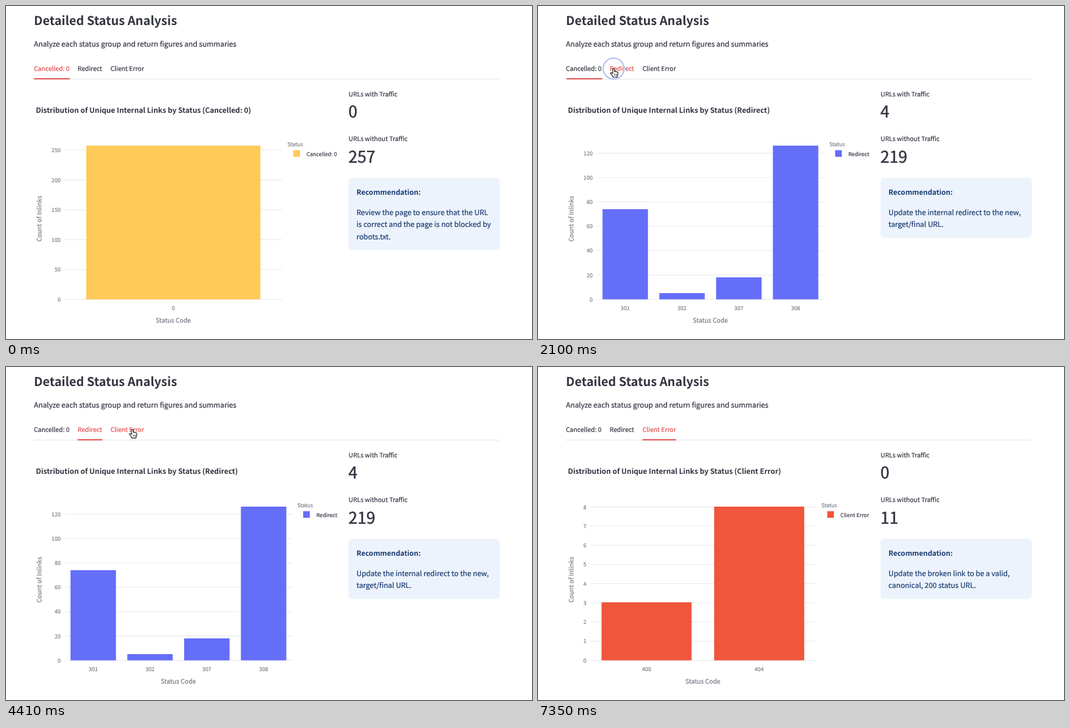
Write an HTML page with a canvas that moves like this. It is 800 px wide and 508 px high and loops after 7630 ms.

```html
<!DOCTYPE html>
<html lang="en">
<head>
<meta charset="utf-8">
<title>Detailed Status Analysis</title>
<style>
  html, body { margin: 0; width: 100%; height: 100%; overflow: hidden; background: #fff; }
  canvas { display: block; width: 100vw; height: 100vh; }
</style>
</head>
<body>
<canvas id="stage" width="800" height="508"></canvas>
<script>
const ctx = document.getElementById('stage').getContext('2d');
const LOOP = 7630, STEP = 70;
const FAMILY = '"Noto Sans CJK JP", "Noto Sans CJK SC", "Noto Sans CJK", "Open Sans", sans-serif';
const INK = '#31333f', MUTED = '#757783', RED = '#e04c4b', NAVY = '#1b3b70';
const BASE = 447.5, FULL = 234;
const BODY = 11, SMALL = 9.58, TINY = 8.2;

const tabs = [
  { label: 'Cancelled: 0', x: 42.5, w: 54.5 },
  { label: 'Redirect', x: 109, w: 37.5 },
  { label: 'Client Error', x: 159, w: 51 }
];

const views = [
  { color: '#ffca57', x0: 89, x1: 420, tick: 50, tickX: 83, legendX: 428,
    bars: [['0', 257]], traffic: ['0', '257'],
    advice: ['Review the page to ensure that the URL', 'is correct and the page is not blocked by', 'robots.txt.'] },
  { color: '#656ef9', x0: 89.5, x1: 435, tick: 20, tickX: 83, legendX: 443,
    bars: [['301', 74], ['302', 5], ['307', 18], ['308', 126]], traffic: ['4', '219'],
    advice: ['Update the internal redirect to the new,', 'target/final URL.'] },
  { color: '#f0563c', x0: 79.5, x1: 422, tick: 1, tickX: 73.5, legendX: 431,
    bars: [['400', 3], ['404', 8]], traffic: ['0', '11'],
    advice: ['Update the broken link to be a valid,', 'canonical, 200 status URL.'] }
];

// Pointer hot spot over time: [ms, x, y]
const route = [
  [0, -14, 330], [490, 34, 285], [1050, 34, 285], [1330, 110, 96], [1680, 115, 95.5],
  [4130, 115, 95.5], [4270, 191, 95], [4480, 193, 95.5],
  [5880, 193, 95.5], [6160, 313, 340], [6440, 375, 525], [LOOP, 375, 525]
];
const clicks = [2030, 4480];

const clamp = v => Math.max(0, Math.min(1, v));
const smooth = v => { v = clamp(v); return v * v * (3 - 2 * v); };
const mix = (a, b, k) => a + (b - a) * k;

function text(str, x, y, size, color = INK, align = 'left', weight = 400) {
  ctx.font = `${weight} ${size}px ${FAMILY}`;
  ctx.textRendering = 'geometricPrecision';
  ctx.fillStyle = ctx.strokeStyle = color;
  ctx.textAlign = align;
  ctx.fillText(str, x, y);
  if (weight > 400) return;
  // A hairline outline gives regular text a slightly firmer stem.
  ctx.lineWidth = size * .018;
  ctx.strokeText(str, x, y);
}

function box(x, y, w, h, color) {
  ctx.fillStyle = color;
  ctx.fillRect(x, y, w, h);
}

function pointerAt(t) {
  const i = route.findIndex(p => p[0] > t);
  const [t0, x0, y0] = route[i - 1], [t1, x1, y1] = route[i];
  const k = (t - t0) / (t1 - t0);
  return { x: mix(x0, x1, k), y: mix(y0, y1, k) };
}

function drawTabs(t, active, hovered) {
  box(42, 111, 709, 1, '#e6e7eb');
  tabs.forEach((tab, i) =>
    text(tab.label, tab.x, 98.6, SMALL, i === active || i === hovered ? RED : INK));
  let { x, w } = tabs[0];
  clicks.forEach((click, i) => {
    const k = smooth((t - click - 50) / 300);
    x = mix(x, tabs[i + 1].x, k);
    w = mix(w, tabs[i + 1].w, k);
  });
  box(x, 110.2, w, 1.8, RED);
}

function drawChart(view, name) {
  const { x0, x1, bars, color, legendX } = view;
  const max = Math.max(...bars.map(b => b[1]));
  const slot = (x1 - x0) / bars.length;
  text(`Distribution of Unique Internal Links by Status (${name})`, 45.5, 163.3, 11.04, INK, 'left', 700);

  for (let v = 0; v <= max; v += view.tick) {
    const y = BASE - v / max * FULL;
    box(x0, y - .5, x1 - x0, 1, '#e8e9ed');
    text(v, view.tickX, y + 3.2, TINY, MUTED, 'right');
  }
  bars.forEach(([label, value], i) => {
    const top = Math.floor(BASE - value / max * FULL);
    box(x0 + slot * (i + .1), top, slot * .8, BASE - top, color);
    text(label, x0 + slot * (i + .5), 464, TINY, MUTED, 'center');
  });
  text('Status Code', (x0 + x1) / 2, 482.5, SMALL, MUTED, 'center');

  ctx.save();
  ctx.translate(53.5, 324.5);
  ctx.rotate(-Math.PI / 2);
  text('Count of Inlinks', 0, 0, SMALL, MUTED, 'center');
  ctx.restore();

  text('Status', legendX, 214, TINY, MUTED);
  box(legendX + 9, 220, 10, 10, color);
  text(name, legendX + 29, 228.7, TINY);
}

function drawSummary({ traffic, advice }) {
  text('URLs with Traffic', 521, 137.6, SMALL);
  text(traffic[0], 520.8, 170.3, 24.6);
  text('URLs without Traffic', 521, 206.3, SMALL);
  text(traffic[1], 520.8, 239, 24.6);

  ctx.fillStyle = '#ecf3fc';
  ctx.beginPath();
  ctx.roundRect(521, 262, 230, 55 + advice.length * 18.4, 6);
  ctx.fill();
  text('Recommendation:', 533, 288, 10.8, NAVY, 'left', 700);
  advice.forEach((line, i) => text(line, 533, 318.5 + i * 18.5, BODY, NAVY));
}

function icon(x, color, path, rule = 'nonzero') {
  ctx.save();
  ctx.translate(x, 139);
  ctx.fillStyle = ctx.strokeStyle = color;
  ctx.lineWidth = 1.4;
  if (rule === 'line') ctx.stroke(new Path2D(path));
  else ctx.fill(new Path2D(path), rule);
  ctx.restore();
}

function drawToolbar(alpha) {
  if (alpha <= 0) return;
  const pale = '#d3d5da', strong = '#a3a6ae';
  const corners = 'M-5-2V-5H-2M2-5H5V-2M5 2V5H2M-2 5H-5V2';
  ctx.globalAlpha = alpha;
  icon(350, pale, 'M-6-3.5H-3L-2-5H2L3-3.5H6V5H-6ZM-2.7 .7a2.7 2.7 0 1 0 5.4 0a2.7 2.7 0 1 0-5.4 0Z', 'evenodd');
  icon(374, strong, 'M-5-1a4 4 0 1 0 8 0a4 4 0 1 0-8 0M2 2L6 6M-3-1H1M-1-3V1', 'line');
  icon(393, pale, 'M-5 0H5M0-5V5M-1.5-4L0-5.5L1.5-4M-1.5 4L0 5.5L1.5 4M-4-1.5L-5.5 0L-4 1.5M4-1.5L5.5 0L4 1.5', 'line');
  icon(417.5, pale, 'M-5.5-5H5.5V5H-5.5ZM-1-3V-1H-3V1H-1V3H1V1H3V-1H1V-3Z', 'evenodd');
  icon(436.5, pale, 'M-5.5-5H5.5V5H-5.5ZM-3-1H3V1H-3Z', 'evenodd');
  icon(455, pale, corners + 'M-3-3L3 3M3-3L-3 3', 'line');
  icon(473, pale, 'M-6 0L0-5.5L6 0H4V5H1V1.5H-1V5H-4V0Z');
  icon(496.5, pale, corners, 'line');
  ctx.globalAlpha = 1;
}

const ARROW = new Path2D('M0 0V11L2.6 8.6L4.4 12.6L6.2 11.8L4.5 8H8Z');
const HAND = new Path2D('M-1.3 .6Q0-1 1.3 .6V4.2Q2.4 3.4 3.3 4.6Q4.4 4 5 5.3Q6.6 5 6.7 6.6' +
  'Q6.8 9.4 5.5 11.2V13H-1.2V11.6L-4.6 7.4Q-4.6 5.6-2.8 6.3L-1.3 7.6Z');
const FINGERS = new Path2D('M1.2 8.2V10.6M2.9 8.2V10.6M4.5 8.2V10.6');
const CROSS = new Path2D('M-5.5 0H5.5M0-5.5V5.5');

function stroke(path, color, width) {
  ctx.strokeStyle = color;
  ctx.lineWidth = width;
  ctx.stroke(path);
}

function drawPointer({ x, y }, kind) {
  ctx.save();
  ctx.translate(x, y);
  ctx.lineJoin = 'round';
  if (kind === 'cross') {
    stroke(CROSS, '#333', 3.4);
    stroke(CROSS, '#fff', 1.4);
  } else if (kind === 'hand') {
    ctx.fillStyle = '#fff';
    ctx.fill(HAND);
    stroke(HAND, '#222', 1.1);
    stroke(FINGERS, '#222', .8);
  } else {
    stroke(ARROW, '#fff', 2);
    ctx.fillStyle = '#111';
    ctx.fill(ARROW);
  }
  ctx.restore();
}

function drawRing({ x, y }, age) {
  if (age < 0 || age > 420) return;
  ctx.globalAlpha = 1 - clamp((age - 70) / 350);
  ctx.strokeStyle = '#b2c2ec';
  ctx.lineWidth = 2;
  ctx.beginPath();
  ctx.arc(x, y, 16 * clamp((age + 70) / 140), 0, Math.PI * 2);
  ctx.stroke();
  ctx.globalAlpha = 1;
}

function draw(t) {
  const active = clicks.filter(click => t >= click + 70).length;
  const pointer = pointerAt(t);
  const { x, y } = pointer;
  const hovered = y > 85 && y < 111 ? tabs.findIndex(tab => x >= tab.x && x <= tab.x + tab.w) : -1;
  const overChart = x > 42 && x < 510 && y > 125 && y < 490 && t > 5880;

  box(0, 0, 800, 508, '#fff');
  text('Detailed Status Analysis', 42.5, 29.2, 18.55, INK, 'left', 700);
  text('Analyze each status group and return figures and summaries', 42.5, 61.8, BODY);
  drawTabs(t, active, hovered);
  drawChart(views[active], tabs[active].label);
  drawSummary(views[active]);
  drawToolbar(Math.min(clamp((t - 5880) / 210), clamp((6580 - t) / 210)));
  clicks.forEach(click => drawRing(pointer, t - click));
  drawPointer(pointer, overChart ? 'cross' : hovered >= 0 ? 'hand' : 'arrow');
}

function frame() {
  const t = performance.now() % LOOP;
  draw(Math.floor(t / STEP) * STEP);
  requestAnimationFrame(frame);
}
frame();
</script>
</body>
</html>
```
